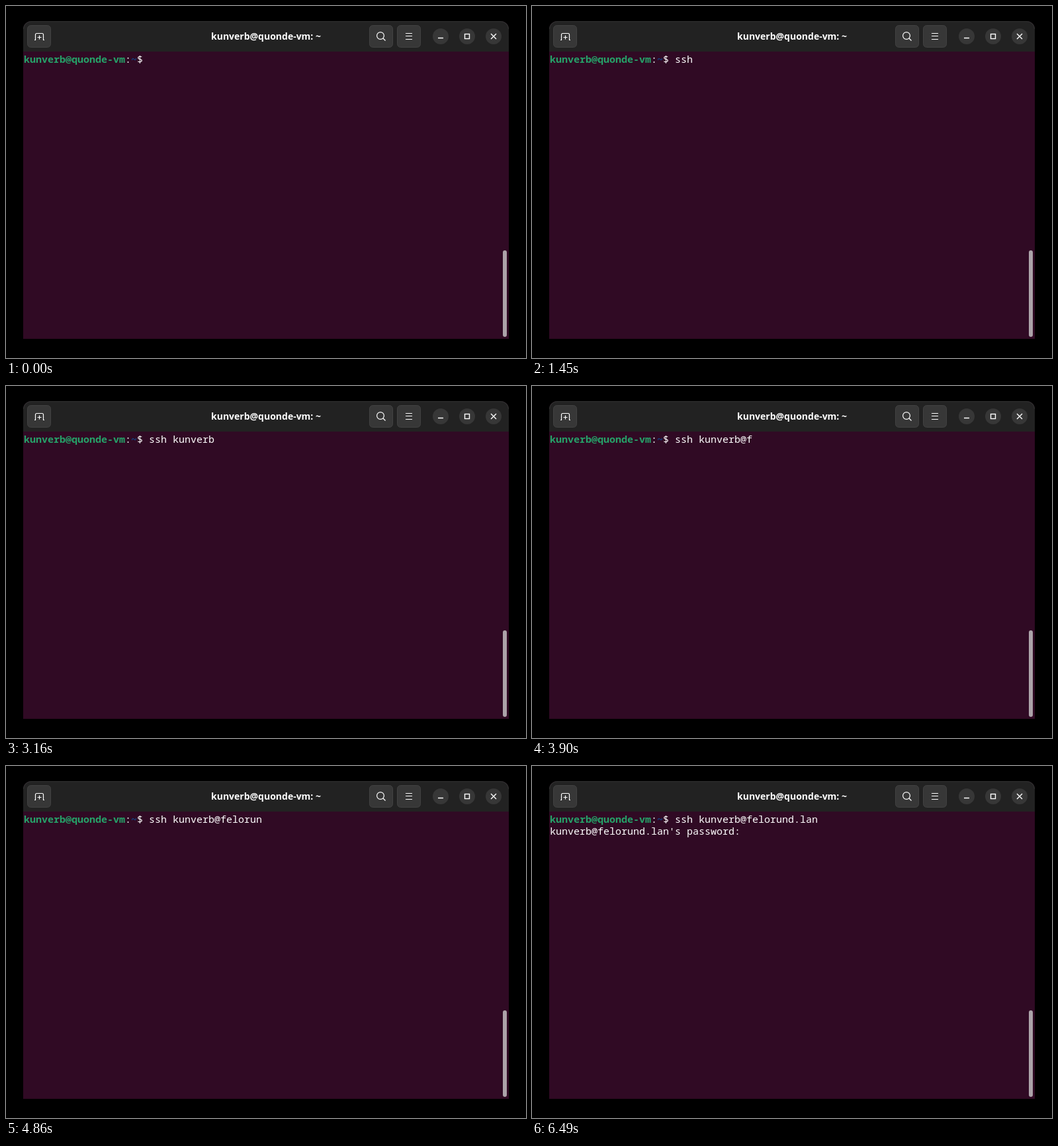
Recreate the animation shown at these times as an HTML page. Size 786 px wide and 533 px high, loop 8 s.

```html
<!DOCTYPE html>
<html lang="en">
<head>
<meta charset="utf-8">
<title>Terminal</title>
<style>
  html, body { margin: 0; width: 100%; height: 100%; overflow: hidden; background: #000; }
  svg { display: block; }
  text { white-space: pre; fill: #fff; }
  .title { font: bold 14px "Open Sans", "Noto Sans", sans-serif; text-anchor: middle; }
  .term { font: 15px "Noto Sans Mono", "DejaVu Sans Mono", monospace; }
  .host { fill: #26a269; font-weight: bold; }
  .path { fill: #12488b; font-weight: bold; }
  .button { fill: #373737; stroke: #424242; stroke-width: 1; }
  .round { fill: #373737; }
  .icon { fill: none; stroke: #fff; stroke-width: 1.2; }
</style>
</head>
<body>
<svg width="786" height="533" viewBox="0 0 786 533">
  <rect width="786" height="533" fill="#000"/>
  <path d="M26 504V35a12 12 0 0 1 12-12H748a12 12 0 0 1 12 12V504z" fill="#300a24"/>
  <path d="M26 69V35a12 12 0 0 1 12-12H748a12 12 0 0 1 12 12V69z" fill="#222"/>
  <path d="M26.5 35a11.5 11.5 0 0 1 11.5-11.5H748a11.5 11.5 0 0 1 11.5 11.5" fill="none" stroke="#333"/>

  <rect class="button" x="32.5" y="29.5" width="35" height="33" rx="5"/>
  <rect class="button" x="549.5" y="29.5" width="35" height="33" rx="5"/>
  <rect class="button" x="591.5" y="29.5" width="35" height="33" rx="5"/>
  <circle class="round" cx="657" cy="46" r="12"/>
  <circle class="round" cx="697" cy="46" r="12"/>
  <circle class="round" cx="737" cy="46" r="12"/>

  <g class="icon">
    <path d="M43 51.5h1.5v-8q0-2 2-2h8q2 0 2 2v8h1.5M47.5 47.5h6M50.5 44.5v6"/>
    <circle cx="566" cy="45" r="5.4"/>
    <path d="M570 49l3.5 3.5"/>
    <path d="M604 41.5h10M604 45.5h10M604 50.5h10"/>
    <path d="M653 48.5h8" stroke-width="1.5"/>
    <rect x="693.5" y="42.5" width="7" height="7" stroke-width="1.4"/>
    <path d="M733 42l8 8m0-8l-8 8" stroke-width="1.4"/>
  </g>

  <text class="title" x="393" y="51">kunverb@quonde-vm: ~</text>
  <text class="term" x="27" y="86"><tspan class="host">kunverb@quonde-vm</tspan>:<tspan class="path">~</tspan>$ <tspan id="command"></tspan></text>
  <text class="term" id="reply" x="27" y="104"></text>
  <rect x="751" y="370" width="6" height="131" rx="3" fill="#aca3a9"/>
</svg>
<script>
  const LOOP = 8000;
  const REPLY_AT = 6490;
  const login = "kunverb@felorund.lan";
  const typed = "ssh " + login;
  // One time per typed character, in ms
  const keyTimes = [
    910, 1110, 1450, 1800,
    2190, 2370, 2530, 2730, 2890, 3070, 3160, 3520,
    3900, 3970, 4170, 4330, 4580, 4670, 4860, 5010,
    5230, 5460, 5590, 5770
  ];
  const command = document.getElementById("command");
  const reply = document.getElementById("reply");

  function render(time) {
    const count = keyTimes.filter(t => t <= time).length;
    command.textContent = typed.slice(0, count);
    reply.textContent = time >= REPLY_AT ? login + "'s password:" : "";
  }

  const start = performance.now();
  function tick() {
    render((performance.now() - start) % LOOP);
    requestAnimationFrame(tick);
  }
  render(0);
  requestAnimationFrame(tick);
</script>
</body>
</html>
```
